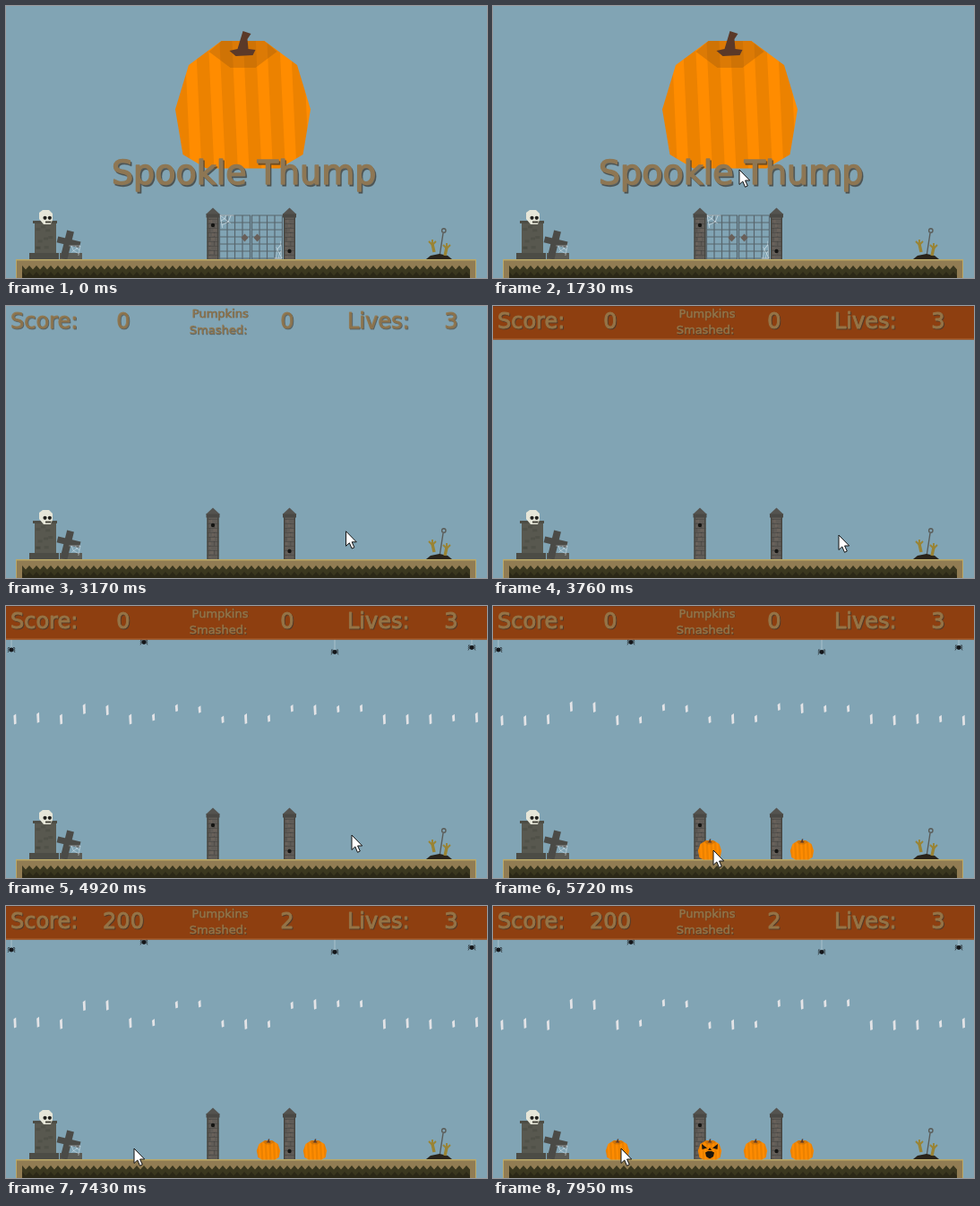
Write an HTML page with a canvas that moves like this. It is 537x304 px and loops after 8 s.

```html
<!DOCTYPE html>
<html lang="en">
<head>
<meta charset="utf-8">
<title>Spookle Thump</title>
<style>
html, body { margin: 0; width: 100%; height: 100%; overflow: hidden; background: #81a4b4; }
canvas { display: block; width: 537px; height: 304px; }
</style>
</head>
<body>
<canvas id="stage"></canvas>
<script>
const W = 537, H = 304, LOOP = 8000;
const canvas = document.getElementById('stage');
const ctx = canvas.getContext('2d');
const dpr = window.devicePixelRatio || 1;
canvas.width = Math.round(W * dpr);
canvas.height = Math.round(H * dpr);

const clamp = v => Math.max(0, Math.min(1, v));
const span = (t, a, b) => clamp((t - a) / (b - a));
const swing = k => 0.5 - Math.cos(k * Math.PI) / 2;
const lerp = (a, b, k) => a + (b - a) * k;
const blend = (a, b, k) => `rgb(${a.map((v, i) => Math.round(lerp(v, b[i], k)))})`;
const rand = n => { const s = Math.sin(n * 127.1 + 3.7) * 43758.5453; return s - Math.floor(s); };
const mirror = half => [...half, ...half.map(([x, y]) => [-x, y]).reverse()];

function trace(points) {
  ctx.beginPath();
  points.forEach(([x, y], i) => i ? ctx.lineTo(x, y) : ctx.moveTo(x, y));
}

function poly(points, fill) {
  trace(points);
  ctx.closePath();
  ctx.fillStyle = fill;
  ctx.fill();
}

function line(points, color, width = 1) {
  trace(points);
  ctx.strokeStyle = color;
  ctx.lineWidth = width;
  ctx.stroke();
}

function rect(x, y, w, h, fill) {
  ctx.fillStyle = fill;
  ctx.fillRect(x, y, w, h);
}

function dot(x, y, r, fill) {
  ctx.beginPath();
  ctx.arc(x, y, r, 0, 7);
  ctx.fillStyle = fill;
  ctx.fill();
}

function placed(x, y, paint) {
  ctx.save();
  ctx.translate(x, y);
  paint();
  ctx.restore();
}

function label(text, x, y, size, color, align = 'left') {
  ctx.font = `${size}px "DejaVu Sans", sans-serif`;
  ctx.textAlign = align;
  ctx.lineJoin = 'round';
  ctx.lineWidth = size / 26;
  const off = size / 24;
  for (const [d, c] of [[off, 'rgba(62,58,52,.6)'], [0, color]]) {
    ctx.fillStyle = ctx.strokeStyle = c;
    ctx.fillText(text, x + d, y + d);
    ctx.strokeText(text, x + d, y + d);
  }
}

// A quarter web of three spokes and two arcs
function web(x, y, sx, sy) {
  placed(x, y, () => {
    ctx.scale(sx, sy);
    const at = (r, i) => [r * Math.cos(i * 0.7), r * Math.sin(i * 0.7)];
    const color = 'rgba(220,232,238,.75)';
    for (let i = 0; i < 3; i++) line([[0, 0], at(14, i)], color, 0.8);
    for (const r of [6, 11]) line([at(r, 0), at(r, 1), at(r, 2)], color, 0.8);
  });
}

function ground() {
  rect(11, 283, 514, 21, '#bba968');
  rect(12, 284.5, 512, 20, '#917c53');
  const teeth = (y, depth, color) => {
    const pts = [[18, H]];
    for (let x = 18, up = 1; x <= 518; x += 4, up = 1 - up) pts.push([x, y + (up ? 0 : depth)]);
    pts.push([518, H]);
    poly(pts, color);
  };
  teeth(290, 4.5, '#3a371f');
  teeth(297, 4.5, '#2b2817');
}

function grave() {
  rect(32, 240, 24, 43, '#58584f');
  rect(30, 240, 27, 3, '#4d4d45');
  rect(26, 276, 33, 7, '#4c4c45');
  for (let i = 0; i < 9; i++)
    rect(33 + rand(i) * 18, 245 + rand(i + 40) * 28, 5, 3, 'rgba(30,32,30,.12)');
  rect(60, 276, 25, 7, '#5b5b55');
  placed(68, 268, () => {
    ctx.rotate(0.24);
    rect(-4, -17, 8, 32, '#4b4b47');
    rect(-12, -8, 26, 7, '#4b4b47');
  });
  web(83, 268, -0.9, 0.8);
  poly([[37, 231], [41, 228], [48, 228], [52, 232], [52, 239], [50, 244], [42, 244], [37, 238]], '#e6e6d8');
  for (const x of [43.5, 48.8]) dot(x, 236.8, 2.1, '#20201c');
  rect(44, 240.5, 6.5, 2, '#46443b');
}

function hand(x, y, lean) {
  placed(x, y, () => {
    const skin = '#9a8434';
    line([[0, 14], [lean, 5]], skin, 3.4);
    for (let i = -1; i <= 1; i++) line([[lean, 6], [lean + i * 4, Math.abs(i) * 2]], skin, 1.9);
  });
}

function mound() {
  line([[484, 280], [488, 254]], '#5a5c58', 1.4);
  ctx.beginPath();
  ctx.arc(488.8, 251, 2.2, 0, 7);
  ctx.stroke();
  poly([[469, 283], [474, 279], [484, 277], [493, 279], [498, 283]], '#29231a');
  hand(478, 261, -2);
  hand(490, 265, 2);
}

function pillar(x, holeY) {
  rect(x - 6.5, 236, 13, 47, '#605c57');
  for (let row = 0; row < 9; row++) {
    const y = 238 + row * 5;
    rect(x - 6.5, y, 13, 0.7, 'rgba(35,35,35,.3)');
    rect(x - 4 + (row % 2) * 5, y, 0.7, 5, 'rgba(35,35,35,.3)');
    rect(x - 6 + rand(row) * 8, y + 1, 4, 3, 'rgba(120,108,98,.4)');
  }
  for (const side of [-6.5, 5.1]) rect(x + side, 236, 1.4, 47, '#46443f');
  poly([[x - 8, 233], [x, 225.5], [x + 8, 233]], '#54534f');
  rect(x - 7.5, 232.5, 15, 4, '#494844');
  dot(x, holeY, 2.2, '#151513');
}

// Door hinged at x; side is 1 for the left leaf and -1 for the right
function door(x, side, k) {
  if (k <= 0.01) return;
  placed(x, 0, () => {
    ctx.scale(side * k, 1);
    const bar = '#58666d';
    for (let i = 0; i <= 4; i++) line([[0.5 + i * 8.5, 234], [0.5 + i * 8.5, 283]], bar, 1.2);
    for (let i = 0; i <= 6; i++) line([[0, 234 + i * 8], [35, 234 + i * 8]], bar, 1);
    poly([[24.5, 259], [28.5, 254.5], [32.5, 259], [28.5, 263.5]], '#685f59');
    if (side > 0) web(1, 234, 1.1, 1);
    else web(1, 282, 0.6, -1.4);
  });
}

// Half outlines around the centre line, measured from the top
const SHELL = mirror([[24, 0], [60.5, 27], [75.5, 76.5], [67, 127], [41, 142.5]]);
const CAP = mirror([[24, 0], [38, 12], [14, 30]]);
const STEM = [[0, -11], [9, -8], [5, -2], [6, 9], [14, 10], [11, 16], [-8, 17], [-15, 11], [-6, 9], [-3, -1]];

// fade 0 is fresh orange, 1 is the dull colour of a vanishing pumpkin
function pumpkin(x, y, sx, sy, fade = 0) {
  placed(x, y, () => {
    ctx.scale(sx, sy);
    ctx.save();
    poly(SHELL, blend([255, 140, 0], [139, 98, 47], fade));
    ctx.clip();
    for (let i = 0; i < 6; i++) {
      const left = i * 26.5 - 78.5;
      poly([[left - 1, -9], [left + 13, -9], [left + 20, 146], [left + 6, 146]], 'rgba(0,0,0,.075)');
    }
    poly(CAP, `rgba(130,75,20,${0.28 - 0.2 * fade})`);
    ctx.restore();
    poly(STEM, blend([91, 57, 40], [63, 90, 125], fade));
  });
}

function face(x, y) {
  placed(x, y, () => {
    const ink = '#1d160c';
    for (const s of [-1, 1]) poly([[s * 9, -6], [s * 3, -1.5], [s * 8.5, 0]], ink);
    poly([[0, -2], [2, 1], [-2, 1]], ink);
    poly(mirror([[2, 2], [5, 3.5], [4, 8], [0, 10.5]]), ink);
  });
}

function title(t) {
  const p = swing(span(t, 1750, 3250));
  const gone = swing(span(t, 2410, 3000));
  if (gone >= 1) return;
  const fade = clamp(p / 0.4);
  ctx.globalAlpha = (1 - p) * (1 - gone);
  pumpkin(264.5, 39, 1, 1, fade);
  ctx.globalAlpha *= 1 - 0.25 * fade;
  label('Spookle Thump', 118, 199, 38, blend([142, 119, 84], [118, 100, 76], fade));
  ctx.globalAlpha = 1;
}

// Carved pumpkins wear a face
const patch = [
  { x: 242, from: 5300, to: 5900 },
  { x: 345, from: 5100, to: LOOP },
  { x: 139, from: 6250, to: 6960 },
  { x: 293, from: 6500, to: LOOP },
  { x: 139, from: 7550, to: LOOP },
  { x: 242, from: 7650, to: LOOP, carved: true }
];
const SMASH = 120;

function pumpkins(t) {
  for (const { x, from, to, carved } of patch) {
    if (t < from || t > to + SMASH) continue;
    ctx.globalAlpha = 1 - span(t, to, to + SMASH);
    pumpkin(x, 262, 0.174, 0.15);
    if (carved) face(x, 272);
    ctx.globalAlpha = 1;
  }
}

// Shards drop in, then the raised groups drift up and the others sink
const raised = i => [[3, 4], [7, 8], [12, 15]].some(([a, b]) => i >= a && i <= b);

function shards(t) {
  for (let i = 0; i < 21; i++) {
    const start = 3790 + rand(i) * 500;
    if (t < start) continue;
    const drift = span(t, 5000, 8000);
    const home = raised(i) ? 115 - 6 * drift : 125.5 + 6.5 * drift;
    const wobble = 1.2 * Math.sin(t / 500 + rand(i + 9) * 6);
    const y = lerp(28, home + wobble, swing(span(t, start, start + 550)));
    const x = 10 + i * 25.77, h = 4.3 + 1.7 * Math.round(rand(i + 60));
    poly([[x - 1.6, y - h + 2], [x + 1.2, y - h], [x + 1.6, y + h - 1], [x - 1, y + h]], '#e3e3e6');
  }
}

function spiders(t) {
  const k = swing(span(t, 3780, 4110));
  if (!k) return;
  for (const [x, end] of [[6, 49], [154, 40.5], [367, 51.5], [520, 46.5]]) {
    const y = lerp(26, end, k);
    line([[x, 30], [x, y]], 'rgba(215,225,230,.6)', 0.8);
    for (const s of [-1, 1])
      for (const d of [-2, 0, 2]) line([[x, y], [x + s * 3, y + d - 1], [x + s * 4, y + d + 1]], '#22262a', 0.7);
    dot(x, y, 2.4, '#14161a');
  }
}

function hud(t) {
  const hits = patch.filter(p => t >= p.to + 20).length;
  const ink = '#957447';
  ctx.globalAlpha = span(t, 3350, 3700);
  rect(0, 0, W, 37.5, '#8e3f10');
  rect(0, 0, W, 1, '#7b3a14');
  rect(0, 36, W, 1.5, '#a05322');
  ctx.globalAlpha = span(t, 2750, 3290);
  label('Score:', 5, 24.5, 24, ink);
  label('Lives:', 381, 24.5, 24, ink);
  label('Pumpkins', 239, 12.5, 13, ink, 'center');
  label('Smashed:', 237, 31, 13, ink, 'center');
  for (const [value, x] of [[hits * 100, 131], [hits, 314], [3, 497]])
    label(String(value), x, 24.5, 24, ink, 'center');
  ctx.globalAlpha = 1;
}

const moves = [
  { from: 900, to: 1440, x: 275, y: 183 },
  { from: 2520, to: 3290, x: 386, y: 256 },
  { from: 4980, to: 5650, x: 246, y: 273 },
  { from: 5960, to: 6600, x: 154, y: 268 },
  { from: 6850, to: 6950, x: 143, y: 271 }
];

function cursor(t) {
  if (t < 900) return;
  let x = 270, y = 304;
  for (const m of moves) {
    const k = swing(span(t, m.from, m.to));
    x = lerp(x, m.x, k);
    y = lerp(y, m.y, k);
  }
  placed(x, y, () => {
    poly([[0, 0], [0, 16.5], [3.8, 13], [6.5, 19.3], [9.3, 18], [6.6, 12], [11.7, 12]], '#fff');
    ctx.strokeStyle = '#111';
    ctx.lineWidth = 1;
    ctx.stroke();
  });
}

function draw(t) {
  ctx.setTransform(dpr, 0, 0, dpr, 0, 0);
  rect(0, 0, W, H, '#81a4b4');
  const shut = 1 - swing(span(t, 1750, 3250));
  door(238, 1, shut);
  door(309, -1, shut);
  pillar(231, 245);
  pillar(316.5, 274);
  grave();
  mound();
  ground();
  title(t);
  pumpkins(t);
  shards(t);
  spiders(t);
  hud(t);
  cursor(t);
}

const begin = performance.now();
function tick() {
  draw((performance.now() - begin) % LOOP);
  requestAnimationFrame(tick);
}
tick();
</script>
</body>
</html>
```
